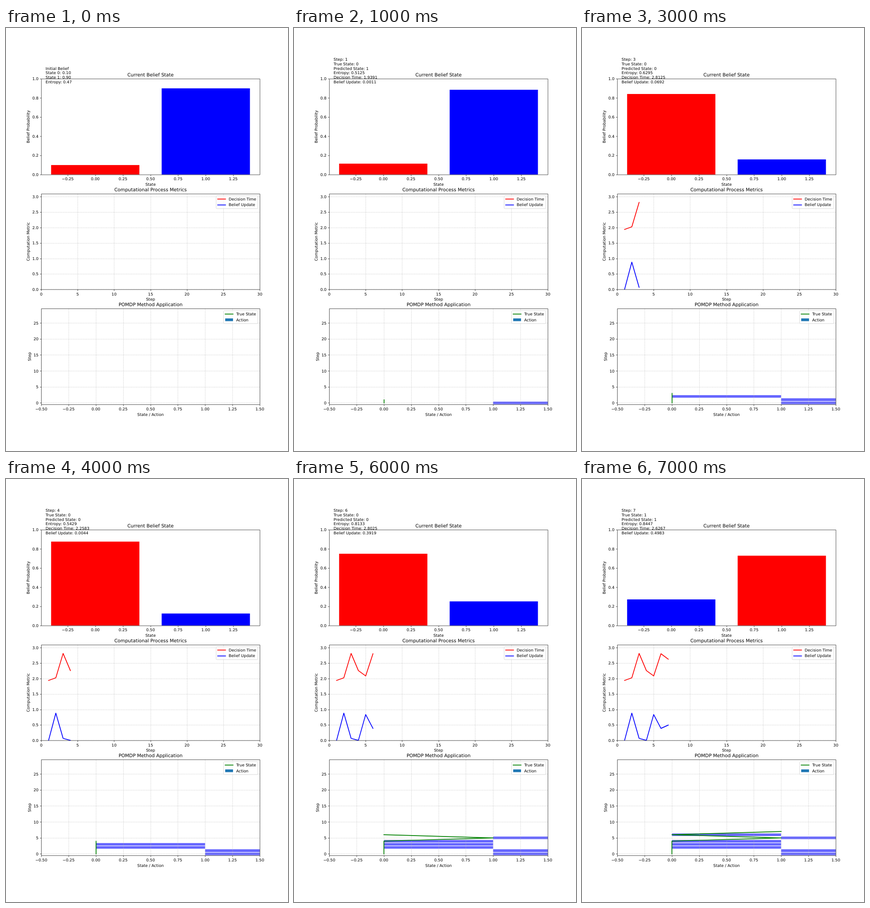
Recreate the animation shown at these times as an HTML page. Size 611 by 917 pixels, loop 8000 ms.

```html
<!DOCTYPE html>
<html lang="en">
<head>
<meta charset="utf-8">
<title>Belief state charts</title>
<style>
  html, body { margin: 0; width: 100%; height: 100%; overflow: hidden; background: #fff; }
  svg { display: block; width: 100vw; height: 100vh; }
  text { font: 13.89px "DejaVu Sans", sans-serif; text-rendering: geometricPrecision; white-space: pre; }
  .title { font-size: 16.67px; }
  .axis { fill: none; stroke: #000; stroke-width: 1.11; }
  .grid { fill: none; stroke: #b0b0b0; stroke-width: 1.11; stroke-dasharray: 4.11 1.78; opacity: .7; }
  .line { fill: none; stroke-width: 2.78; stroke-linecap: square; stroke-linejoin: round; }
  .frame { fill: #fff; stroke: #ccc; stroke-width: 1.39; opacity: .8; }
</style>
</head>
<body>
<svg id="stage" viewBox="0 0 1000 1500" preserveAspectRatio="none"></svg>
<script>
const STEP_MS = 1000;
const L = 125, R = 900, H = 339.706;

// true state, predicted state, P(state 0), entropy, decision time, belief update
const steps = [
  [0, 1, 0.1, 0.469],
  [0, 1, 0.1142, 0.5125, 1.9391, 0.0011],
  [0, 0, 0.679, 0.9057, 2.0243, 0.8845],
  [0, 0, 0.842, 0.6295, 2.8125, 0.0692],
  [0, 0, 0.8753, 0.5429, 2.2583, 0.0044],
  [1, 1, 0.3172, 0.9013, 2.0858, 0.8388],
  [0, 0, 0.7487, 0.8133, 2.8025, 0.3919],
  [1, 1, 0.2722, 0.8447, 2.6267, 0.4983]
].map(([truth, guess, p, entropy, time, update]) => ({ truth, guess, p, entropy, time, update }));

const stage = document.getElementById('stage');

function add(parent, tag, attrs, text) {
  const el = document.createElementNS('http://www.w3.org/2000/svg', tag);
  for (const k in attrs) el.setAttribute(k, attrs[k]);
  if (text !== undefined) el.textContent = text;
  parent.appendChild(el);
  return el;
}

const snap = v => Math.floor(v + 0.5) + 0.5;
const range = (from, to, by) =>
  Array.from({ length: Math.round((to - from) / by) + 1 }, (_, i) => from + i * by);
const fmt = (v, digits) => v.toFixed(digits).replace('-', '\u2212');
const path = pts => pts.length ? 'M' + pts.map(p => p.join(' ')).join('L') : '';

function label(x, y, text, anchor = 'middle', extra = {}) {
  return add(stage, 'text', { x, y, 'text-anchor': anchor, ...extra }, text);
}

// Builds one chart; its bars lie under the grid and its lines above it.
function chart(o) {
  const { top, xlim, ylim } = o, bottom = top + H;
  const X = v => L + (v - xlim[0]) / (xlim[1] - xlim[0]) * (R - L);
  const Y = v => bottom - (v - ylim[0]) / (ylim[1] - ylim[0]) * H;
  const id = 'clip' + Math.round(top);
  add(add(stage, 'clipPath', { id }), 'rect', { x: L, y: top, width: R - L, height: H });
  const layer = () => add(stage, 'g', { 'clip-path': `url(#${id})` });

  const bars = layer();
  if (o.grid) {
    const g = layer();
    for (const v of o.xticks) add(g, 'path', { class: 'grid', d: `M${snap(X(v))} ${bottom}V${top}` });
    for (const v of o.yticks) add(g, 'path', { class: 'grid', d: `M${L} ${snap(Y(v))}H${R}` });
  }
  const lines = layer();

  const b = snap(bottom), l = snap(L);
  for (const v of o.xticks) {
    add(stage, 'path', { class: 'axis', d: `M${snap(X(v))} ${b}v4.86` });
    label(X(v), bottom + 20.8, fmt(v, o.digits[0]));
  }
  for (const v of o.yticks) {
    add(stage, 'path', { class: 'axis', d: `M${l} ${snap(Y(v))}h-4.86` });
    label(L - 9.72, Y(v) + 5.1, fmt(v, o.digits[1]), 'end');
  }
  add(stage, 'path', { class: 'axis', d: `M${l} ${snap(top)}H${snap(R)}V${b}H${l}Z` });

  const mid = (L + R) / 2;
  label(mid, top - 8.33, o.title, 'middle', { class: 'title' });
  label(mid, bottom + 40.2, o.xlabel);
  label(0, 0, o.ylabel, 'middle', { transform: `translate(${o.ylabelX} ${top + H / 2}) rotate(-90)` });

  const line = color => add(lines, 'path', { class: 'line', stroke: color });
  const bar = (fill, opacity = 1) => add(bars, 'rect', { fill, 'fill-opacity': opacity });
  return { X, Y, top, line, bar };
}

function legend(top, textX, entries) {
  const x = textX - 44.5, y = top + 6.94;
  add(stage, 'rect', { class: 'frame', x, y, width: 893.06 - x, height: 46, rx: 2.8 });
  entries.forEach(([name, color, patch], i) => {
    const base = y + 16.7 + i * 20.6, hx = x + 5.56;
    if (patch) add(stage, 'rect', { x: hx, y: base - 9.72, width: 27.78, height: 9.72, fill: color });
    else add(stage, 'path', { class: 'line', stroke: color, d: `M${hx} ${snap(base - 5.3)}h27.78` });
    label(textX, base, name, 'start');
  });
}

function place(rect, x0, x1, y0, y1) {
  const [a, b, c, d] = [x0, x1, y0, y1].map(Math.round);
  rect.setAttribute('x', a);
  rect.setAttribute('width', b - a);
  rect.setAttribute('y', c);
  rect.setAttribute('height', d - c);
}

const belief = chart({
  top: 180, xlim: [-0.49, 1.49], ylim: [0, 1],
  xticks: range(-0.25, 1.25, 0.25), yticks: range(0, 1, 0.2), digits: [2, 1],
  title: 'Current Belief State', xlabel: 'State', ylabel: 'Belief Probability', ylabelX: 84
});
const metrics = chart({
  top: 587.647, xlim: [0, 30], ylim: [0, 3.09375], grid: true,
  xticks: range(0, 30, 5), yticks: range(0, 3, 0.5), digits: [0, 1],
  title: 'Computational Process Metrics', xlabel: 'Step', ylabel: 'Computation Metric', ylabelX: 84
});
const method = chart({
  top: 995.294, xlim: [-0.5, 1.5], ylim: [-0.5, 29.5], grid: true,
  xticks: range(-0.5, 1.5, 0.25), yticks: range(0, 25, 5), digits: [2, 0],
  title: 'POMDP Method Application', xlabel: 'State / Action', ylabel: 'Step', ylabelX: 88.3
});
legend(metrics.top, 789.6, [['Decision Time', 'red'], ['Belief Update', 'blue']]);
legend(method.top, 816.2, [['True State', 'green'], ['Action', '#1f77b4', true]]);

const beliefBars = [belief.bar('red'), belief.bar('blue')];
const timeLine = metrics.line('red');
const updateLine = metrics.line('blue');
const stateLine = method.line('green');

// Each action follows the prediction of the step before it.
const actionBars = steps.slice(0, -1).map(({ guess }, i) => {
  const rect = method.bar('blue', 0.6);
  place(rect, method.X(guess), method.X(guess + 1), method.Y(i + 0.4), method.Y(i - 0.4));
  return rect;
});

const info = Array.from({ length: 6 }, (_, i) => label(140.5, 197 - (5 - i) * 16.3, '', 'start'));

function infoLines(n) {
  const s = steps[n];
  if (!n) return ['', '', 'Initial Belief', `State 0: ${s.p.toFixed(2)}`,
    `State 1: ${(1 - s.p).toFixed(2)}`, `Entropy: ${s.entropy.toFixed(2)}`];
  return [`Step: ${n}`, `True State: ${s.truth}`, `Predicted State: ${s.guess}`,
    `Entropy: ${s.entropy.toFixed(4)}`, `Decision Time: ${s.time.toFixed(4)}`,
    `Belief Update: ${s.update.toFixed(4)}`];
}

function show(n) {
  const s = steps[n], past = steps.slice(0, n + 1);
  infoLines(n).forEach((t, i) => { info[i].textContent = t; });

  beliefBars.forEach((rect, i) => {
    const p = i ? 1 - s.p : s.p;
    rect.setAttribute('fill', i === s.truth ? 'red' : 'blue');
    place(rect, belief.X(i - 0.4), belief.X(i + 0.4), belief.Y(p), belief.Y(0));
  });

  const trace = key => path(past.map((q, i) => [metrics.X(i), metrics.Y(q[key])]).slice(1));
  timeLine.setAttribute('d', trace('time'));
  updateLine.setAttribute('d', trace('update'));

  // A purely vertical line sits on whole pixels.
  const fit = past.some(q => q.truth) ? v => v : snap;
  stateLine.setAttribute('d', path(past.map((q, i) => [fit(method.X(q.truth)), fit(method.Y(i))])));
  actionBars.forEach((rect, i) => rect.setAttribute('visibility', i < n ? 'visible' : 'hidden'));
}

let shown = -1;
const start = performance.now();
function tick() {
  const n = Math.floor((performance.now() - start) / STEP_MS) % steps.length;
  if (n !== shown) show(shown = n);
  requestAnimationFrame(tick);
}
tick();
</script>
</body>
</html>
```
